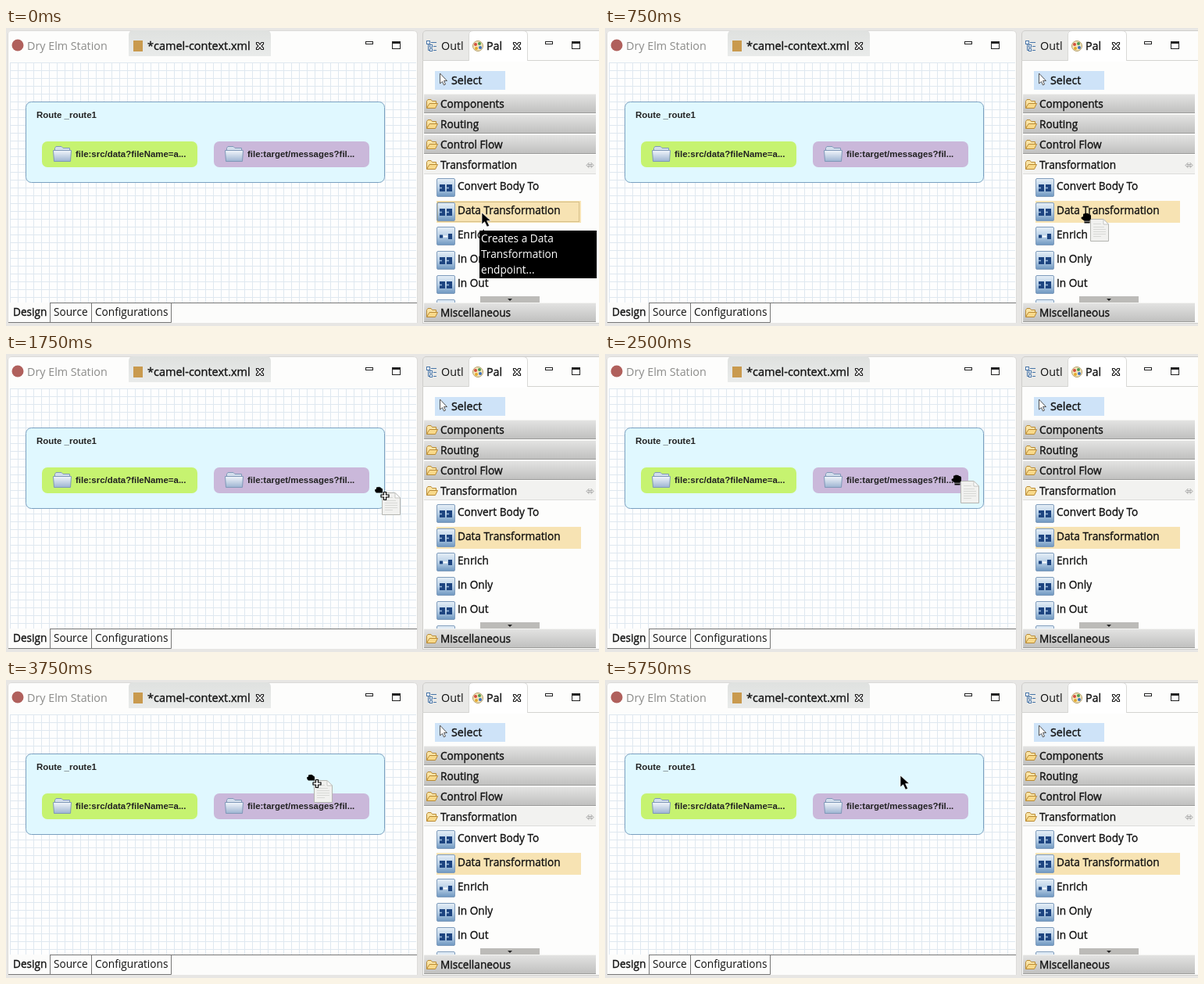
An HTML page for the animation above (6500 ms loop, 759 by 381 pixels).

```html
<!DOCTYPE html>
<html lang="en">
<head>
<meta charset="utf-8">
<title>Drag a transformation onto a route</title>
<style>
html, body { margin: 0; width: 100%; height: 100%; overflow: hidden; background: #e7e6e4; }
svg { display: block; }
text { font: 13.65px "Open Sans", "Noto Sans", sans-serif; fill: #111; }
.tab { font-size: 14.3px; }
.strong { stroke: #111; stroke-width: .35px; }
.node { font: bold 11.45px "Liberation Sans", Arial, sans-serif; fill: #222; }
.line { fill: none; stroke: #222; }
#tip text { fill: #fff; }
</style>
</head>
<body>
<svg width="759" height="381" viewBox="0 0 759 381">
  <defs>
    <linearGradient id="bar" x2="0" y2="1">
      <stop stop-color="#e4e4e3"/><stop offset="1" stop-color="#bfbfbe"/>
    </linearGradient>
    <linearGradient id="tabFill" x2="0" y2="1">
      <stop stop-color="#dfe1df"/><stop offset="1" stop-color="#e9ebea"/>
    </linearGradient>
    <linearGradient id="blue" x2="0" y2="1">
      <stop stop-color="#e6eff7"/><stop offset=".5" stop-color="#b9d0e6"/><stop offset="1" stop-color="#6d96c0"/>
    </linearGradient>
    <linearGradient id="steel" x2="0" y2="1">
      <stop stop-color="#f2f6fb"/><stop offset="1" stop-color="#9db4d2"/>
    </linearGradient>
    <pattern id="grid" x="5" y="44" width="10" height="10" patternUnits="userSpaceOnUse">
      <path d="M.5 0V10M0 .5H10" stroke="#dfe8f0"/>
    </pattern>
    <clipPath id="list"><rect x="535" y="188" width="220" height="163"/></clipPath>

    <g id="folder" stroke="#b98a34" stroke-linejoin="round">
      <path d="M.5 11.5V2.5L2 .5H6L7.5 2.5H12.5V5" fill="#fbe5a6"/>
      <path d="M.5 11.5L4 5.5H14.5L11.5 11.5Z" fill="#f8d98a"/>
    </g>
    <g id="bigFolder" stroke="#7f98b8" stroke-linejoin="round">
      <path d="M2.5 8V2.5L4 .5H11L13 2.5H21.5V8Z" fill="#d3deec"/>
      <path d="M.5 5.5H23.5L22.5 19.5H1.5Z" fill="url(#steel)"/>
    </g>
    <g id="box">
      <rect x=".5" y=".5" width="23" height="23" rx="1.5" fill="url(#blue)" stroke="#7f9cbc"/>
    </g>
    <g id="convert">
      <use href="#box"/>
      <path d="M4 8H11V17H4ZM13 8H20V17H13Z" fill="#1d4480"/>
      <path d="M4 12.5H7M13 12.5H16" stroke="#9dbbdc" stroke-width="1.5"/>
    </g>
    <g id="enrich">
      <use href="#box"/>
      <path d="M4 10.5H8V14.5H4ZM15 9H20V16H15Z" fill="#1d4480"/>
      <path d="M9 12.5H14" stroke="#fff" stroke-width="2"/>
    </g>
    <g id="close" class="line" stroke-width="1.2">
      <path d="M.5 .5H3L5 3.2 7 .5H9.5V2.5L7 5 9.5 7.5V9.5H7L5 6.8 3 9.5H.5V7.5L3 5 .5 2.5Z" fill="#fff"/>
    </g>
    <g id="window" class="line">
      <rect x=".5" y=".5" width="9" height="3" fill="#fff"/>
      <rect x="34.5" y=".5" width="10" height="9" fill="#fff"/><path d="M34 2H45" stroke-width="2"/>
    </g>
  </defs>

  <!-- editor -->
  <path d="M2 381V8Q2 3 7 3H521Q526 3 526 8V381Z" fill="#fdfdfc"/>
  <path d="M2.5 377V8Q2.5 3.5 7 3.5H521Q526.5 3.5 526.5 8V377" fill="none" stroke="#dcdbd9"/>
  <path d="M157 36V9Q157 3 163 3H333Q339 3 339 9V36Z" fill="url(#tabFill)"/>
  <circle cx="15" cy="22" r="7.5" fill="#b0605c"/>
  <text class="tab" x="27" y="28" style="fill:#8b8b89">Dry Elm Station</text>
  <rect x="163" y="16" width="12" height="14" fill="#c99a4e"/>
  <text class="strong" x="181" y="28" style="font-size:14.5px">*camel-context.xml</text>
  <use href="#close" x="320" y="18"/>
  <use href="#window" x="460" y="17"/>
  <rect x="5" y="44" width="520" height="307" fill="#fefefe"/>
  <rect x="5" y="44" width="520" height="307" fill="url(#grid)"/>
  <rect x="25.5" y="94.5" width="459" height="103" rx="7" fill="#e0f8ff" stroke="#7aa0c0"/>
  <text class="node" x="39" y="115">Route _route1</text>
  <rect x="46" y="145" width="199" height="33" rx="7" fill="#c6f370"/>
  <rect x="266" y="145" width="199" height="33" rx="7" fill="#cab8da"/>
  <use href="#bigFolder" x="60" y="151"/>
  <use href="#bigFolder" x="280" y="151"/>
  <text class="node" x="89" y="165">file:src/data?fileName=a...</text>
  <text class="node" x="309" y="165">file:target/messages?fil...</text>

  <rect x="3" y="351" width="523" height="26" fill="#fcfcfb"/>
  <path d="M56.5 351.5H526M56.5 351V376.5M109.5 351V376.5M211.5 351V376.5M3 376.5H211.5" fill="none" stroke="#777"/>
  <rect x="2" y="377" width="525" height="4" fill="#e7e6e4"/>
  <text class="strong" x="9" y="368">Design</text>
  <text x="61" y="368">Source</text>
  <text x="114" y="368">Configurations</text>

  <!-- palette -->
  <path d="M533 378V8Q533 3 538 3H759V378Z" fill="#fdfdfc"/>
  <path d="M533 42V8Q533 3 538 3H598V42Z" fill="#e9e9e7"/>
  <path d="M592 43V9Q592 3 598 3H662Q668 3 668 9V43Z" fill="#fff"/>
  <path d="M592.5 42V9Q592.5 3.5 598 3.5H662Q667.5 3.5 667.5 9V42" fill="none" stroke="#d9d9d6"/>
  <path d="M533.5 378V8Q533.5 3.5 538 3.5H759M533 377.5H759" fill="none" stroke="#cfcecb"/>
  <path d="M533 41.5H592M668 41.5H759" stroke="#d4d4d1"/>
  <g fill="#fff" stroke="#4775a8">
    <path d="M540.5 19V28.5H544M544 18.5H551M547 23.5H551M547 28.5H551" fill="none"/>
    <rect x="538.5" y="16.5" width="4" height="4"/><rect x="542.5" y="21.5" width="3" height="3"/><rect x="542.5" y="26.5" width="3" height="3"/>
  </g>
  <text class="tab" x="557" y="28">Outl</text>
  <circle cx="604" cy="23" r="6.5" fill="#f4e6bd" stroke="#b29a62"/>
  <circle cx="601" cy="21" r="2" fill="#d34c3e"/><circle cx="606" cy="20" r="2" fill="#4c9b4f"/>
  <circle cx="607" cy="25" r="2" fill="#3e71bc"/><circle cx="602" cy="26" r="2" fill="#e4a92d"/>
  <text class="tab strong" x="615" y="28">Pal</text>
  <use href="#close" x="649" y="18"/>
  <use href="#window" x="690" y="17"/>
  <rect x="549" y="55" width="90" height="24" fill="#cee3f8"/>
  <path d="M555.5 58V71L558.5 68.5 560.5 73 562.5 72 560.5 67.5H564.5Z" fill="#fff" stroke="#555"/>
  <text class="tab strong" x="570" y="72">Select</text>
  <g id="bars"></g>
  <path d="M746.5 172L743 175.5 746.5 179M748.5 172L752 175.5 748.5 179M745 174.5H750M745 176.5H750" fill="none" stroke="#888" stroke-width=".8"/>
  <g id="items" clip-path="url(#list)">
    <rect x="551" y="221" width="185" height="28" fill="#f7e3b3"/>
  </g>
  <rect x="607" y="343" width="76" height="8" fill="#bcbbb8"/>
  <path d="M642 346H648L645 349Z" fill="#222"/>

  <!-- pointer and drag feedback -->
  <rect id="focus" x="552.5" y="222.5" width="181" height="25" fill="none" stroke="#b59a5c" stroke-dasharray="1 1"/>
  <g id="tip">
    <rect x="606" y="259" width="150" height="61"/>
    <text x="608" y="274">Creates a Data</text>
    <text x="608" y="294">Transformation</text>
    <text x="608" y="314">endpoint...</text>
  </g>
  <g id="pointer">
    <g id="doc" transform="translate(12 9)">
      <path d="M.5 .5H17L23.5 7V28.5H.5Z" fill="#f1f1ef" stroke="#b4b5b1"/>
      <path d="M17 .5V7H23.5Z" fill="#fff" stroke="#c3c4c0"/>
      <path d="M4 6.5H14M4 10.5H18M4 13.5H20M4 16.5H20M4 19.5H20M4 22.5H14" stroke="#d8d9d6"/>
    </g>
    <path id="arrow" d="M0 0V15L3.6 11.8 6.7 18.2 9.6 16.8 6.6 10.6H11.5Z" stroke="#fff" stroke-width=".7"/>
    <g id="fist">
      <path d="M.5 7L3 6V3.5Q3.5 1.8 5 2.5Q6 .6 7.5 2Q9 1 10 3Q12.5 2.5 13 5V9L11.5 11V14.5H4.5V11.5L.8 9Z"/>
      <path d="M4.5 12.2H11.5" stroke="#fff" stroke-width=".7"/>
    </g>
    <g id="copy">
      <path d="M3 5.5L5 4.5V3Q6 1.5 7.2 2.5Q8.5 1 9.5 2.6Q11 2 11.4 3.7Q13 3.5 13 5.3V9.5H5Q3 8 3 5.5Z"/>
      <path d="M14.5 8.5H17.5V12H21V15H17.5V18.5H14.5V15H11V12H14.5Z" fill="#fff" stroke="#000" stroke-width="1.2"/>
    </g>
  </g>
</svg>
<script>
const $ = id => document.getElementById(id);
const show = (id, on) => { $(id).style.display = on ? "" : "none"; };

const bars = [["Components", 84], ["Routing", 110], ["Control Flow", 136], ["Transformation", 162], ["Miscellaneous", 351]];
$("bars").innerHTML = bars.map(([name, y]) => `
  <rect x="535" y="${y}" width="220" height="25" fill="${y === 162 ? "#f2f2f0" : "url(#bar)"}"/>
  <path d="M535 ${y + .5}H755" stroke="#f4f4f2"/>
  <path d="M535 ${y + 24.5}H755" stroke="${y === 162 ? "#dcdcda" : "#9c9c9a"}"/>
  <use href="#folder" x="538" y="${y + 7}"/>
  <text class="strong" x="556" y="${y + 18}">${name}</text>`).join("");

const items = ["Convert Body To", "Data Transformation", "Enrich", "In Only", "In Out", ""];
$("items").innerHTML += items.map((name, i) => `
  <use href="#${name === "Enrich" ? "enrich" : "convert"}" x="551" y="${192 + 31 * i}"/>
  <text class="strong" x="578" y="${207 + 31 * i}">${name}</text>`).join("");

// start time, x, y, pointer shape
const steps = [
  [0, 609, 236, "arrow"], [500, 609, 235, "fist"], [1000, 573, 200, "fist"],
  [1250, 531, 190, "fist"], [1500, 509, 181, "copy"], [1750, 469, 168, "copy"],
  [2000, 470, 167, "copy"], [2250, 470, 167, "fist"], [2500, 443, 153, "fist"],
  [2750, 441, 152, "fist"], [3000, 441, 152, "copy"], [3250, 416, 136, "copy"],
  [3500, 395, 126, "copy"], [3750, 382, 119, "copy"], [4000, 379, 123, "copy"],
  [4250, 378, 123, "fist"], [4750, 378, 122, "arrow"]
];

function draw() {
  const t = performance.now() % 6500;
  const [, x, y, shape] = steps.findLast(s => s[0] <= t);
  $("pointer").setAttribute("transform", `translate(${x} ${y})`);
  for (const id of ["arrow", "fist", "copy"]) show(id, id === shape);
  show("tip", t < 750);
  show("focus", t < 750);
  show("doc", t >= 750 && t < 4750);
  requestAnimationFrame(draw);
}
draw();
</script>
</body>
</html>
```
